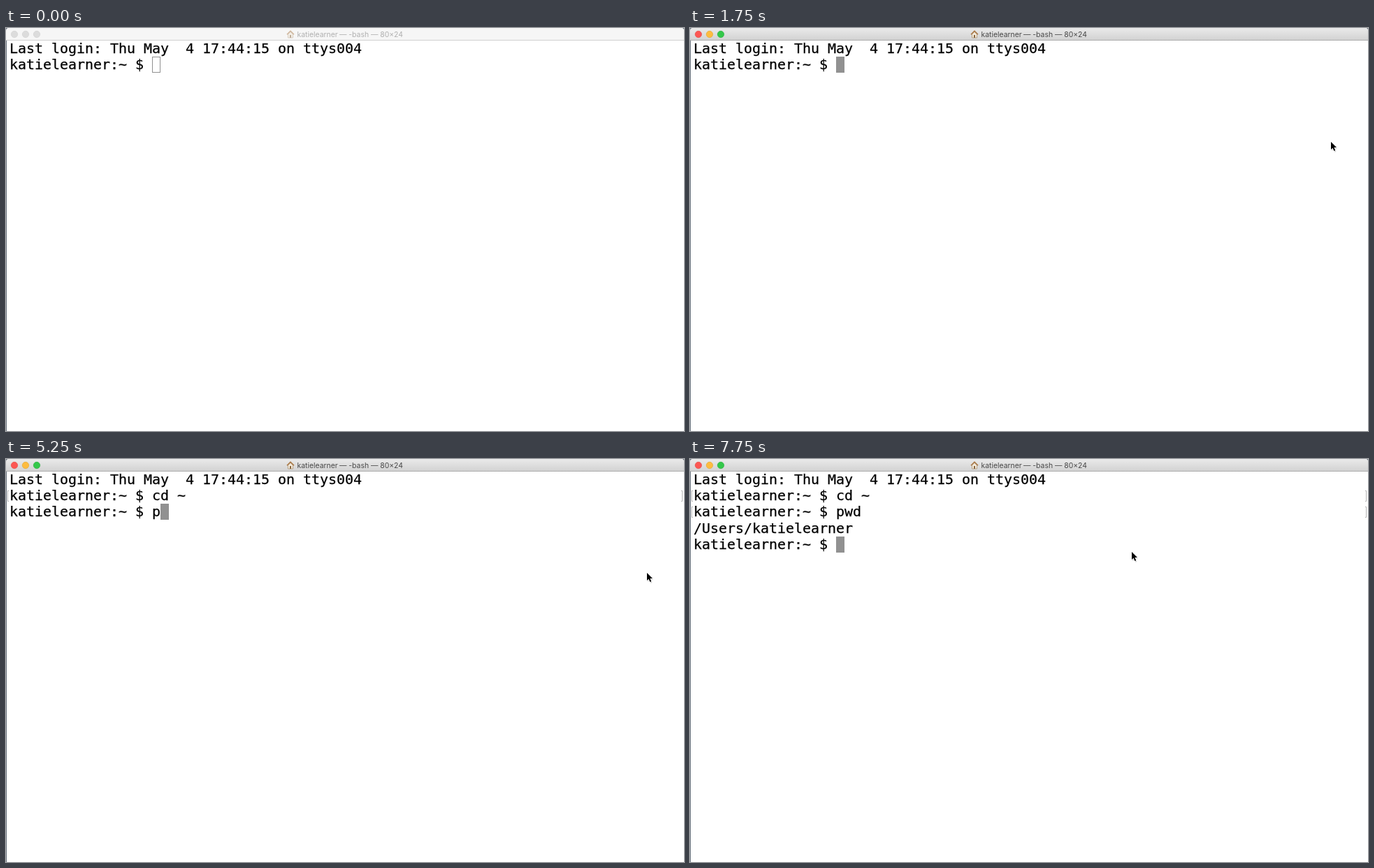
Write an HTML page that moves like this. It is 970 px wide and 577 px high and loops after 8 s.

```html
<!DOCTYPE html>
<html lang="en">
<head>
<meta charset="utf-8">
<title>Terminal session</title>
<style>
  html, body { margin: 0; width: 100%; height: 100%; overflow: hidden; background: #fff; }
  svg { display: block; width: 970px; height: 577px; }
  text { white-space: pre; }
  .line { font: 20px "DejaVu Sans Mono", monospace; letter-spacing: -.041px; stroke: #000; stroke-width: .25px; }
  .title { font: 10.4px Inter, Roboto, sans-serif; fill: #484848; }
  .idle .title { fill: #b0b0b0; }
  .idle .house { opacity: .5; }
  .idle .light { fill: #dcdcdc; stroke: #cecece; }
  .idle .bar { fill: #f6f6f6; }
  .bar { fill: url(#metal); }
  .rule { fill: #adadad; }
  .idle .rule { fill: #d0d0d0; }
  .block { fill: #919191; stroke: #919191; }
  .idle .block { fill: none; }
  .mark { fill: none; stroke: #b4b4b4; }
</style>
</head>
<body>
<svg id="stage" viewBox="0 0 970 577">
  <defs>
    <linearGradient id="metal" x2="0" y2="1">
      <stop stop-color="#eaeaea"/>
      <stop offset="1" stop-color="#d1d1d1"/>
    </linearGradient>
  </defs>
  <rect width="970" height="577" fill="#66707c"/>
  <path d="M1 577V4q0-4 4-4h961q4 0 4 4v573z" fill="#fff"/>
  <path class="bar" d="M0 18V4q0-4 4-4h962q4 0 4 4v14z"/>
  <rect class="rule" y="17" width="970" height="1"/>

  <circle class="light" cx="12" cy="9" r="4.7" fill="#fc5753" stroke="#e2463f" stroke-width=".6"/>
  <circle class="light" cx="28" cy="9" r="4.7" fill="#fdbc40" stroke="#e1a325" stroke-width=".6"/>
  <circle class="light" cx="44" cy="9" r="4.7" fill="#34c84a" stroke="#1fad33" stroke-width=".6"/>

  <g class="house">
    <path d="M403.5 9v5h7V9L407 5.500z" fill="#f3eadb" stroke="#a58a68" stroke-width=".7"/>
    <path d="M402 9.300l5-5 5 5" fill="none" stroke="#a8743f" stroke-width="1.500"/>
    <path d="M406 10h2v4h-2z" fill="#8a673f"/>
  </g>
  <text class="title" id="owner" x="416.500" y="13"></text>
  <text class="title" x="568" y="13" text-anchor="end">— -bash — 80×24</text>

  <g id="screen"></g>
  <rect class="block" id="caret" width="11" height="22"/>

  <g id="pointer">
    <path d="M1 2v11l2.500-2 2 4 2-1-1.600-4H9z" fill="#000" opacity=".16"/>
    <path d="M0 0v11l2.500-2.300 1.900 4.300 1.900-.8-1.900-4.200H8z" stroke="#fff" stroke-width="1.300" paint-order="stroke"/>
  </g>
</svg>

<script>
  const LOOP = 8000, LEFT = 5, CELL = 12, TOP = 18, PITCH = 23.2;
  const user = 'katielearner';
  const prompt = `${user}:~ $ `;

  // [time in ms, text added to the screen]
  const output = [
    [0, `Last login: Thu May  4 17:44:15 on ttys004\n${prompt}`],
    [2250, 'c'], [2500, 'd '], [3000, '~'], [3250, '\n'], [3500, prompt],
    [5250, 'p'], [5750, 'w'], [6000, 'd'],
    [6500, `\n/Users/${user}\n${prompt}`]
  ];

  // [time in ms, tip x, tip y]
  const moves = [
    [0, 990, -30], [250, 966, -10], [500, 777, 30], [750, 563, 107],
    [1000, 549, 107], [1500, 674, 136], [1750, 917, 163],
    [7500, 918, 166], [7750, 632, 133]
  ];

  const byId = id => document.getElementById(id);
  const stage = byId('stage'), screen = byId('screen');
  const caret = byId('caret'), pointer = byId('pointer');
  byId('owner').textContent = user;

  const rowTop = row => Math.round(TOP + row * PITCH);
  const past = (steps, t) => steps.filter(step => step[0] <= t);

  function add(tag, attrs, text = '') {
    const node = document.createElementNS(stage.namespaceURI, tag);
    for (const key in attrs) node.setAttribute(key, attrs[key]);
    node.textContent = text;
    screen.append(node);
  }

  function showText(content) {
    const lines = content.split('\n'), last = lines.length - 1;
    screen.replaceChildren();
    lines.forEach((line, row) => {
      const y = rowTop(row);
      add('text', { class: 'line', x: LEFT, y: y + 18 }, line);
      if (row < last && line.startsWith(prompt)) {
        add('path', { class: 'mark', d: `M4 ${y + 4.5}H2.500v15H4M966 ${y + 4.5}h1.500v15H966` });
      }
    });
    caret.setAttribute('x', LEFT + lines[last].length * CELL + .5);
    caret.setAttribute('y', rowTop(last) + .5);
  }

  let shown;
  const start = performance.now();

  function draw() {
    const t = (performance.now() - start) % LOOP;
    const content = past(output, t).map(step => step[1]).join('');
    if (content !== shown) showText(shown = content);
    const [, x, y] = past(moves, t).pop();
    pointer.setAttribute('transform', `translate(${x} ${y})`);
    stage.classList.toggle('idle', t < 1250);
    requestAnimationFrame(draw);
  }
  draw();
</script>
</body>
</html>
```
